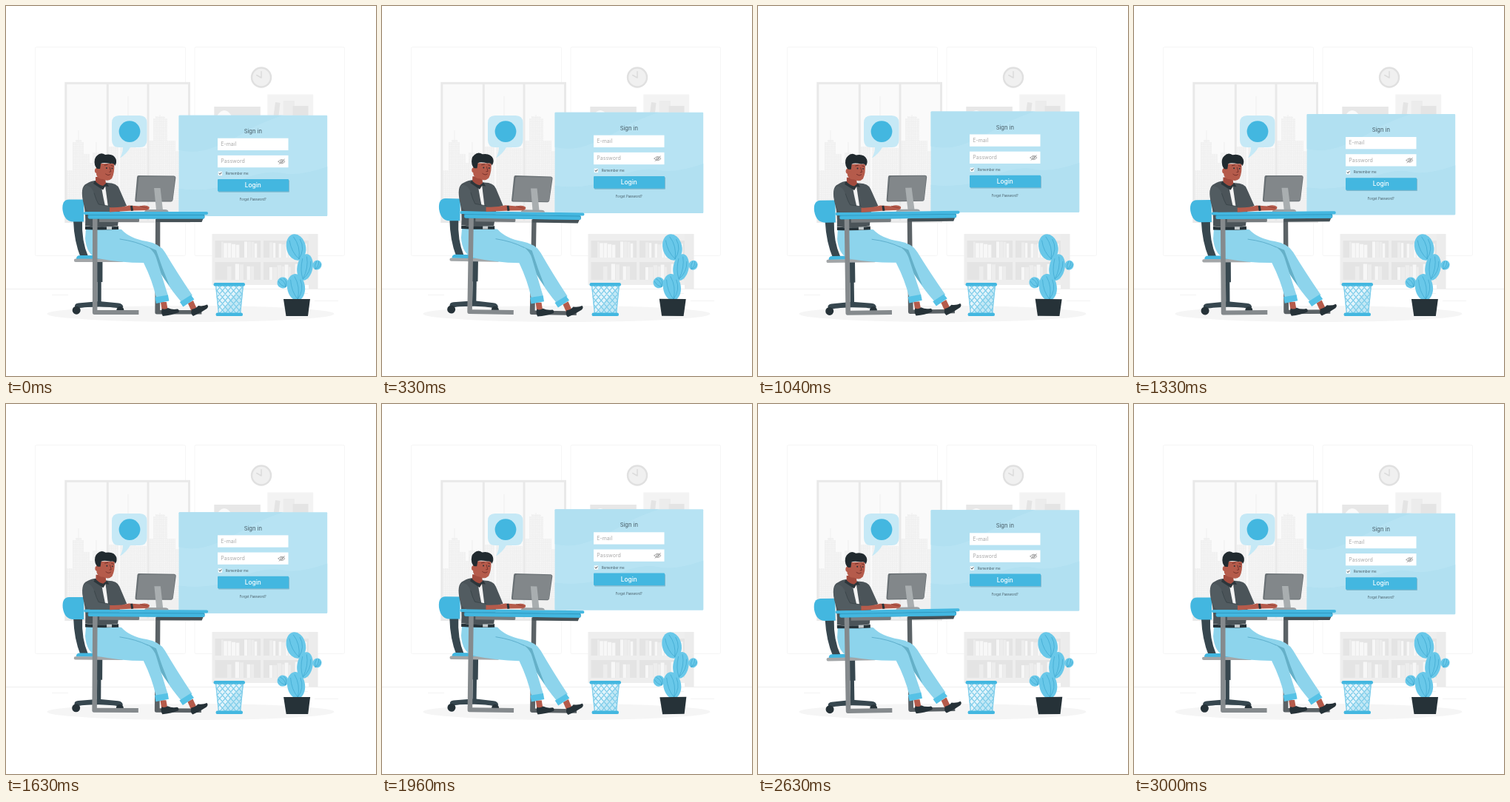
Animation of 500 by 500 pixels, one loop 3.04 s. Source, as an HTML page:

```html
<!DOCTYPE html>
<html lang="en">
<head>
<meta charset="utf-8">
<title>Sign in</title>
<style>
html, body { margin: 0; width: 100%; height: 100%; overflow: hidden; background: #fff; }
svg { display: block; width: 100%; height: 100%; }
text { font-family: Inter, Roboto, sans-serif; }
.line { fill: none; stroke-linecap: round; stroke-linejoin: round; }
</style>
</head>
<body>
<svg viewBox="0 0 500 500">
  <defs>
    <pattern id="dots" width="2.6" height="2.6" patternUnits="userSpaceOnUse">
      <rect width="2.6" height="2.6" fill="#f0f0f0"/>
      <rect x=".6" y=".6" width="1.2" height="1.3" fill="#fafafa"/>
    </pattern>
    <clipPath id="pane"><rect x="82" y="106" width="164" height="184"/></clipPath>
    <clipPath id="basket"><path d="M283 377H321L317 416H287Z"/></clipPath>
    <clipPath id="card"><rect x="233.6" y="148" width="200.6" height="136.3" rx="1"/></clipPath>
  </defs>

  <!-- Room -->
  <g fill="none" stroke="#f5f5f5">
    <rect x="39.500" y="55.500" width="203" height="282" rx="2"/>
    <rect x="255" y="55.500" width="202.500" height="282" rx="2"/>
  </g>
  <path d="M0 382.500H500" stroke="#eee"/>
  <path d="M417 398.500H449M62 390.500H84M398 388.500H408" stroke="#f3f3f3"/>
  <rect x="80.500" y="104" width="167" height="187.500" fill="#fafafa"/>
  <g clip-path="url(#pane)">
    <g id="city"></g>
    <path d="M98 168V185M122 184V200M165 122V165M208 147V152" stroke="#efefef"/>
  </g>
  <path d="M80.800 104.300H247.500V291.500H80.800ZM137.300 104V291M192 104V291" fill="none" stroke="#e9e9e9" stroke-width="3"/>

  <circle cx="345" cy="96.500" r="13" fill="#f0f0f0" stroke="#e0e0e0" stroke-width="2.400"/>
  <path class="line" d="M345 88.500V97L338.800 93.500" stroke="#dcdcdc" stroke-width="1.600"/>
  <rect x="281.300" y="136" width="62.500" height="48" fill="#e7e7e7"/>
  <path d="M286 160V147Q295 135 304 147V160Z" fill="#fafafa"/>
  <rect x="353.300" y="119.500" width="62" height="50" fill="#f3f3f3"/>
  <path d="M364 130L370.500 131L367 160H360Z" fill="#e4e4e4"/>
  <path d="M374.500 128H390V160H374.500Z" fill="#ececec"/>
  <path d="M387.500 135H408.500V160H387.500Z" fill="#e4e4e4"/>

  <path d="M278.500 308H409V377H278.500Z" fill="#eee"/>
  <path d="M409 308H421.500V382H409Z" fill="#ececec"/>
  <g fill="#e4e4e4">
    <path d="M282.500 317H344V340H282.500ZM348 317H409V340H348ZM282.500 346H344V370H282.500ZM348 346H409V370H348Z"/>
  </g>
  <g id="books"></g>
  <ellipse cx="249.500" cy="416" rx="194" ry="11" fill="#f5f5f5"/>

  <!-- Speech bubble -->
  <path d="M153 148H180.500Q190.500 148 190.500 158V181Q190.500 191 180.500 191H168Q163 200 154 205.500Q158 198 158 191H153Q143 191 143 181V158Q143 148 153 148Z" fill="#c6e9f6"/>
  <circle cx="167" cy="169.600" r="14.400" fill="#43b7e0"/>

  <!-- Sign-in card -->
  <g id="panel">
    <g clip-path="url(#card)">
      <rect x="233" y="147" width="202" height="139" fill="#b7e3f3"/>
      <path d="M233 195Q258 201 284 190T326 169T377 147H233Z" fill="#b1e0f1"/>
      <path d="M233 285V247Q276 253 313 237T373 226T435 217V285Z" fill="#b1e0f1"/>
    </g>
    <text x="333.800" y="172.200" font-size="7.600" text-anchor="middle" fill="#455a64">Sign in</text>
    <g fill="#fff">
      <rect x="286" y="179" width="95.500" height="16.300"/>
      <rect x="286" y="202.200" width="95.500" height="16.300"/>
      <rect x="286.700" y="224" width="5.400" height="5.400"/>
    </g>
    <g fill="#a9a9a9" font-size="7">
      <text x="290.300" y="189.300">E-mail</text>
      <text x="290.300" y="212.700">Password</text>
    </g>
    <g class="line" stroke="#8f8f8f" stroke-width=".8">
      <path d="M368 210.500Q372.500 205 377 210.500Q372.500 216 368 210.500ZM369 213.800L376.500 207.300"/>
      <circle cx="372.500" cy="210.500" r="1.600"/>
    </g>
    <path class="line" d="M288 226.700L289.200 227.800L291 225.500" stroke="#263238" stroke-width=".9"/>
    <text x="296.700" y="228.300" font-size="4.500" fill="#455a64">Remember me</text>
    <rect x="287" y="235.600" width="96" height="16.500" rx="1" fill="#7eb9d0"/>
    <rect x="286" y="234.300" width="96" height="16.500" rx="1" fill="#43b7e0"/>
    <text x="333.800" y="245.300" font-size="8.300" font-weight="500" text-anchor="middle" fill="#fff">Login</text>
    <text x="333.800" y="263.600" font-size="4.250" text-anchor="middle" fill="#455a64">Forgot Password?</text>
  </g>

  <!-- Bin -->
  <path d="M283 377H321L317 416H287Z" fill="#e3f4fb"/>
  <path d="M321 377L317 416H291L303 396Z" fill="#c3e8f5"/>
  <path id="mesh" class="line" clip-path="url(#basket)" stroke="#7fcdea" stroke-width="1.300"/>
  <path d="M283.500 377L287.500 416M320.500 377L316.500 416" stroke="#7fcdea" stroke-width="1.300"/>
  <rect x="280.500" y="374" width="42.500" height="4.600" rx="2.200" fill="#43b7e0"/>
  <rect x="283.500" y="414.500" width="36.500" height="4.600" rx="2.200" fill="#43b7e0"/>

  <!-- Cactus -->
  <g id="cactus">
    <g id="pads"></g>
    <path d="M375 396H411L408 419H378.500Z" fill="#263238"/>
  </g>

  <!-- Man, chair and desk -->
  <g id="man">
    <path d="M91 290H103Q102 318 111 338L101 340Q92 318 91 290Z" fill="#37474f"/>
    <path d="M85 261.500H105V291.500H91Q79 291.500 76.500 276Q75 262 85 261.500Z" fill="#43b7e0"/>
    <path d="M122.300 345H130.500V373H128.800V401H123.500V373H122.300Z" fill="#37474f"/>
    <path d="M93 406Q93 402 98 401.500L126 399L152 401.500Q158 402 158.500 407L153 409Q150 407 126 406.500Q101 407 97 409Z" fill="#37474f"/>
    <circle cx="95.300" cy="411.300" r="5.500" fill="#263238"/>
    <circle cx="154.500" cy="411" r="5" fill="#263238"/>
    <path d="M95 342Q95 337 100 337H150L156 342Z" fill="#43b7e0"/>
    <rect x="92" y="341.700" width="67" height="4.300" rx="2" fill="#a3a6a8"/>

    <path d="M202 288H208.300V411H264.500V416.500H204Q201.500 416.500 201.500 414Z" fill="#5b6266"/>

    <!-- Legs -->
    <path d="M246 402L253 398L258 409L251 413Z" fill="#b55b4b"/>
    <path d="M209 400H217L219 412H211Z" fill="#b55b4b"/>
    <path d="M251 410Q257 409 260 405Q267 406 272 403.500Q274.500 406 271.500 409Q263 415 253 419Q249 416 251 410Z" fill="#263238"/>
    <path d="M211 409Q215 411 219 408Q225 411 232 409.500Q235 411 233.500 414Q224 418 212 419Q209 414 211 409Z" fill="#263238"/>
    <path d="M140 300L156 302Q167 314 190 318Q208 321 215 333Q231 360 252 391L238 401Q211 370 200 340L150 318Z" fill="#8dd4ec"/>
    <path d="M153 314Q184 321 203 330Q211 354 221 378Q207 361 199 341Z" fill="#65b0c8"/>
    <path d="M108 301H152Q157 313 178 320Q198 325 203 340Q212 369 219 391L203 394Q198 371 186 347Q155 347 124 341Q109 337 107 314Z" fill="#8dd4ec"/>
    <path class="line" d="M154 315Q176 318 192 326" stroke="#4a9fbf" stroke-width=".7"/>
    <path d="M235 400L250 390.500L254.500 396.500L239.500 406.500Z" fill="#56c2e6"/>
    <path d="M201.500 393.500L219 390.500L220.500 398.500L203 402Z" fill="#56c2e6"/>

    <!-- Torso -->
    <path d="M109 240Q115 236 122 236L137 239Q150 239 153 247L163 270L154 273L151 297Q130 301 107 297Q108 280 105 268Q99 244 109 240Z" fill="#4b5459"/>
    <path d="M107 297.500Q130 300 152 297.500V302Q130 303 107 302Z" fill="#263238"/>
    <rect x="136" y="298" width="7" height="4" fill="#c3cacc"/>
    <path d="M129 245L134 243L138 272L135.500 277Q131 258 129 245Z" fill="#f4f4f4"/>
    <path d="M121 231H134L135 242L131 248L121 239Z" fill="#a24b3e"/>
    <path d="M120 236Q125 242 131 243L136 239L139 244L134 243.500L131 248.500Q124 244 118 240Z" fill="#2c363b"/>

    <!-- Head -->
    <path d="M122 213H146Q147 225 143 233Q138 238 131 234Q124 234 122 228Z" fill="#b55b4b"/>
    <circle cx="123.600" cy="222.500" r="3.800" fill="#b55b4b"/>
    <path d="M120 215Q118 206 123 202Q128 197 134 201Q145 199 148.500 207Q150 212 147 216Q146 212 141 213Q131 211 128 213L127 220H124Q122 220 120 215Z" fill="#212a2f"/>
    <path class="line" d="M133 215.500L137 214.500M142 215.500L145 216.500M140 218L141.700 224L139.500 224.300M134.500 227Q138 230 141 227.500" stroke="#6e2d28" stroke-width=".9"/>
    <circle cx="135.800" cy="219" r="1" fill="#263238"/>
    <circle cx="143.300" cy="219.500" r=".9" fill="#263238"/>

    <!-- Desk -->
    <path d="M126 286H180V291Q180 292 178 292H126Z" fill="#777c7f"/>
    <path d="M203 286H267L264.500 292H203Z" fill="#465156"/>
    <path d="M117 287H123.500V411H179.500V417H119.500Q117 417 117 414Z" fill="#858a8d"/>
    <rect x="110.500" y="281.500" width="158" height="6" rx="2" fill="#3199c0"/>
    <rect x="111" y="283" width="157" height="4.500" rx="2" fill="#43b7e0"/>
    <rect x="105" y="278" width="168" height="4" rx="2" fill="#43b7e0"/>

    <!-- Monitor -->
    <path d="M179 229L227 229.500Q229.500 230 229.300 232L225.500 262Q225 264.500 223 264.500H176Q174 264.500 174.300 262L177 231Q177.300 229 179 229Z" fill="#697074"/>
    <path d="M181 230.500H227Q228.500 230.500 228.300 232L225 262.500Q225 263.500 223.500 263.500H177.500Q176 263.500 176.200 262L179.300 232Z" fill="#82878a"/>
    <path d="M200 246H208.500L212 276H203Z" fill="#a9aeb0"/>
    <path d="M187 278Q188 275 192 275H215Q219 275 219.500 278Z" fill="#9aa0a3"/>

    <!-- Arms -->
    <path d="M138 272Q154 273 166 269.500L181 270.500Q189 268 193.500 271.500Q194.500 275 190 276L171 276.500L140 278.500Z" fill="#b55b4b"/>
    <path d="M168 270L170.800 269.700L172 276.500L169 277Z" fill="#263238"/>
    <path class="line" d="M181 270.500Q185 272 191 273" stroke="#86382f" stroke-width=".7"/>
    <path d="M107 243Q115 242 119 253Q122 263 125 268L140 270.500L140 278H114Q108 277 106 269Q100 250 107 243Z" fill="#525c61"/>
    <path class="line" d="M119 253Q122 263 125 268L140 270.500" stroke="#343f44" stroke-width=".7"/>
  </g>
</svg>
<script>
const LOOP = 3040, LEAD = 25;
const $ = id => document.getElementById(id);
const box = (x, y, w, h, fill) => `<rect x="${x}" y="${y}" width="${w}" height="${h}" fill="${fill}"/>`;

// Skyline: left, width, top
const towers = [
  [82, 9, 222], [90, 15, 184], [94, 8, 181], [105, 8, 200], [112, 10, 212], [117, 9, 198],
  [128, 9, 206], [139, 13, 190], [154, 22, 166], [160, 10, 160], [176, 14, 192],
  [193, 8, 182], [199, 19, 152], [202, 13, 149], [218, 11, 182], [229, 18, 196]
];
$('city').innerHTML = towers.map(([x, w, y]) => box(x, y, w, 270 - y, 'url(#dots)')).join('') +
  box(82, 262, 164, 28, '#f0f0f0');

let seed = 7;
const rand = () => (seed = seed * 16807 % 2147483647) / 2147483647;
let books = '';
for (const [left, floor] of [[283, 340], [348, 340], [283, 370], [348, 370]]) {
  for (let x = left + 8; x < left + 56;) {
    const w = 2.5 + rand() * 3, h = 17 + rand() * 5;
    if (rand() > .2) books += box(x, floor - h, w, h, rand() > .4 ? '#f7f7f7' : '#ededed');
    x += w + .7;
  }
}
$('books').innerHTML = books;

let mesh = '';
for (let x = 240; x < 365; x += 7.5) mesh += `M${x} 376l36 42M${x} 376l-36 42`;
$('mesh').setAttribute('d', mesh);

// Cactus pads: centre, radii, tilt
const pads = [
  [392, 326, 13, 18, -14], [420.5, 350, 6, 6.5, 25], [404, 353, 10.5, 18, 10],
  [374, 374, 7.5, 7.5, -35], [392, 380, 12, 18, -8]
];
$('pads').innerHTML = pads.map(([x, y, a, b, tilt]) => `
  <g transform="translate(${x} ${y}) rotate(${tilt})">
    <ellipse rx="${a}" ry="${b}" fill="#69c8e9"/>
    <path class="line" stroke="#3fa9d0" stroke-width=".7"
      d="M0 ${-b * .8}Q${a * .5} 0 0 ${b * .9}M${-a * .5} ${-b * .6}Q${-a * .6} ${b * .3} 0 ${b * .9}M${a * .6} ${-b * .5}Q${a * .9} ${b * .3} 0 ${b * .9}"/>
  </g>`).join('');

// Straight-line swing: 0, 1, 0, -1 at the quarters of a cycle
const swing = u => 1 - 4 * Math.abs((u + 1.25) % 1 - .5);
const move = (id, value) => $(id).setAttribute('transform', value);

function draw(now) {
  const t = now % LOOP + LEAD, fast = t / (LOOP / 2), slow = t / LOOP;
  move('panel', `translate(0 ${-4.65 * (1 + swing(fast - .25))})`);
  move('man', `rotate(${swing(fast)} 174 310)`);
  move('cactus', `rotate(${swing(slow)} 396 363)`);
}

const start = performance.now();
function tick() {
  draw(performance.now() - start);
  requestAnimationFrame(tick);
}
tick();
</script>
</body>
</html>
```
